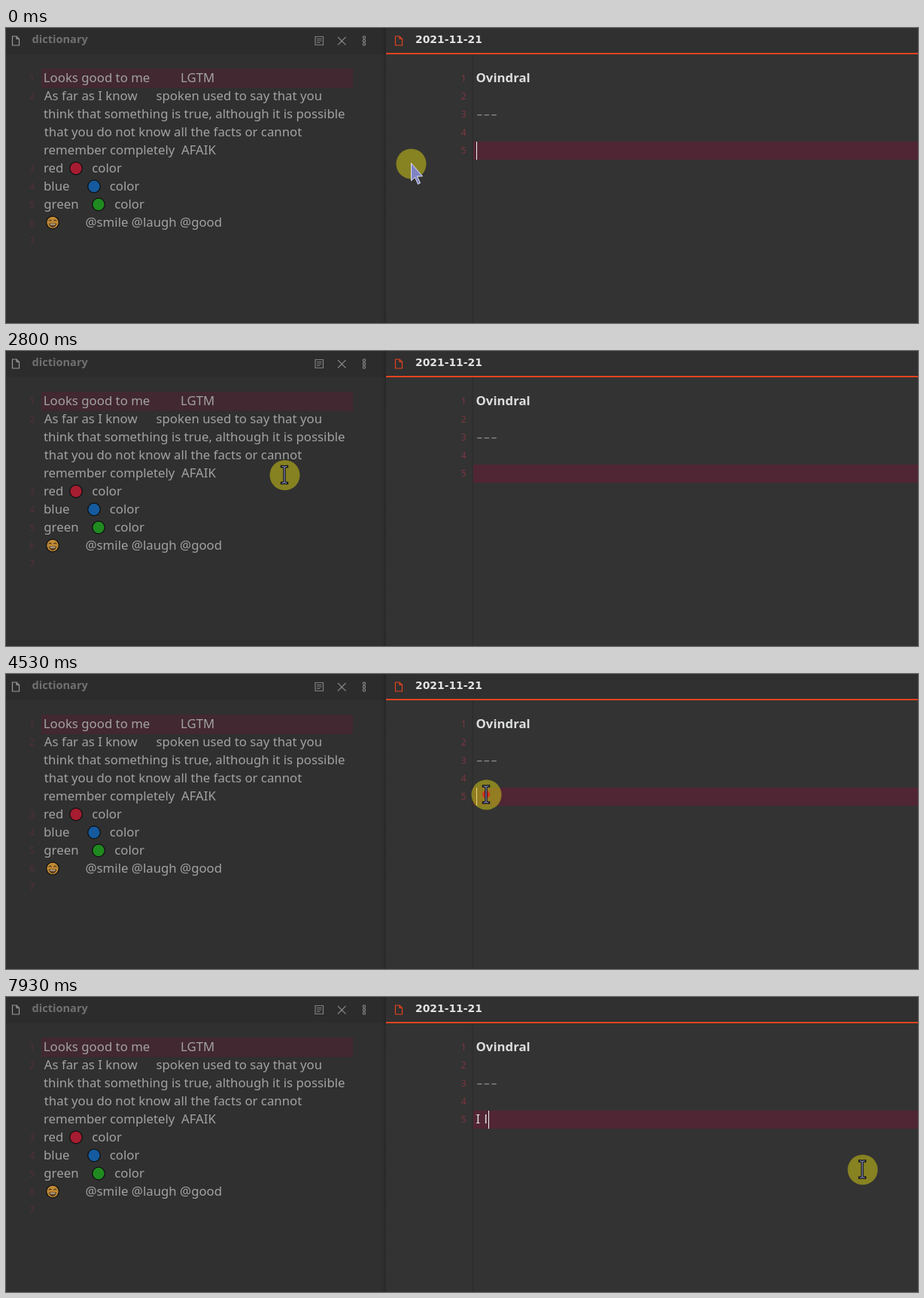
Recreate the animation shown at these times as an HTML page. Size 1212 by 392 pixels, loop 8 s.

```html
<!DOCTYPE html>
<html lang="en">
<head>
<meta charset="utf-8">
<title>Two-pane editor</title>
<style>
  html, body { margin: 0; width: 100%; height: 100%; overflow: hidden; background: #333; }
  svg { display: block; }
  text { font: 16.8px "Noto Sans", sans-serif; white-space: pre; }
  .left { fill: #a2a2a2; }
  .right { fill: #dcddde; }
  .title { font-size: 14.6px; font-weight: 700; }
  .date { font: 700 13.9px "DejaVu Sans", sans-serif; }
  .bold { font-weight: 700; }
  .rule { font: 16px "Noto Sans Mono", monospace; fill: #8c8c8c; }
  .num { font-size: 12px; text-anchor: end; }
  .icon { fill: none; stroke: #808080; stroke-width: 1.2; }
</style>
</head>
<body>
<svg width="1212" height="392" viewBox="0 0 1212 392">
  <defs>
    <linearGradient id="edge"><stop stop-color="#000" stop-opacity="0"/><stop offset="1" stop-color="#000" stop-opacity=".16"/></linearGradient>
    <path id="file" d="M.5 .5H6L9.5 4V12.5H.5ZM6 .5V4H9.5"/>
    <path id="beam" d="M-3.5 -11H-1.5L0 -10L1.5 -11H3.5M0 -10V10M-3.5 11H-1.5L0 10L1.5 11H3.5"/>
  </defs>

  <rect width="505" height="392" fill="#303030"/>
  <rect width="505" height="35" fill="#2c2c2c"/>
  <rect x="499" width="6" height="392" fill="url(#edge)"/>
  <rect x="505" width="707" height="33" fill="#303030"/>
  <rect x="505" width="707" y="33" height="2" fill="#e3441f"/>
  <rect x="619.5" y="35" width="1" height="357" fill="#2b2b2b"/>
  <rect x="47" y="54" width="414" height="26" fill="#422830"/>
  <rect x="621" y="151" width="591" height="24" fill="#512634"/>

  <g class="icon">
    <use href="#file" x="8" y="10.5" stroke="#9a9a9a"/>
    <use href="#file" x="517" y="10.5" stroke="#e3441f"/>
    <path d="M411 11.5H421.5V22.5H411ZM413 14.5H419.5M413 17H419.5M413 19.5H417.5M441 12L451.5 22.5M451.5 12L441 22.5"/>
    <circle cx="476" cy="12.5" r="1.7"/><circle cx="476" cy="17" r="1.7"/><circle cx="476" cy="21.5" r="1.7"/>
  </g>

  <g id="page"></g>

  <g stroke="#111" stroke-width="1.3">
    <circle cx="93" cy="186.5" r="8.3" fill="#a61c30"/>
    <circle cx="117" cy="210.5" r="8.3" fill="#155a9f"/>
    <circle cx="123" cy="234.5" r="8.3" fill="#1f8a1f"/>
    <circle cx="62" cy="258.5" r="8.3" fill="#c08a35"/>
  </g>
  <g fill="none" stroke="#3a2814" stroke-width="1.2">
    <path d="M57 256.5Q58.5 254 60.5 256.5M63.5 256.5Q65.5 254 67 256.5"/>
    <path d="M57.5 260H66.5Q65.5 264.5 62 264.5Q58.5 264.5 57.5 260Z" fill="#6b4a28" stroke-width="1"/>
    <path d="M58.5 260.8H65.5" stroke="#cfc6b8"/>
  </g>

  <text id="typed" class="right" x="624.5" y="168" style="word-spacing:1px"></text>
  <rect id="caret" y="151" width="1" height="24" fill="#f2f2f2"/>

  <g id="pointer">
    <circle cx=".5" cy=".5" r="20" fill="rgba(204,196,20,.55)"/>
    <circle id="click" r="5" fill="#d2301f"/>
    <path id="arrow" d="M.5 -.5V23L5.5 18.5L9.5 27.5L12.5 26L8.5 17H15.5Z" fill="#8084c4" stroke="#dcdcec" stroke-width="1"/>
    <g id="ibeam" fill="none">
      <use href="#beam" stroke="#10101c" stroke-width="3.4" stroke-linecap="square"/>
      <use href="#beam" stroke="#8f97c4" stroke-width="1.1"/>
    </g>
  </g>
</svg>
<script>
const LOOP = 8000, FPS = 15, BLINK = 533;
const $ = id => document.getElementById(id);
const row = n => 72 + 24 * n;

function write(text, x, y, cls, fill) {
  const el = document.createElementNS("http://www.w3.org/2000/svg", "text");
  el.setAttribute("x", x);
  el.setAttribute("y", y);
  el.setAttribute("class", cls);
  if (fill) el.setAttribute("fill", fill);
  el.textContent = text;
  $("page").append(el);
}

write("dictionary", 34.5, 20, "title", "#707070");
write("2021-11-21", 544, 20, "date", "#e2e2e2");

// Each chunk: text, x, row
[
  ["Looks good to me", 49.8, 0], ["LGTM", 232, 0],
  ["As far as I know", 50.8, 1], ["spoken used to say that you", 199.5, 1],
  ["think that something is true, although it is possible", 50, 2],
  ["that you do not know all the facts or cannot", 50.8, 3],
  ["remember completely", 50, 4], ["AFAIK", 233, 4],
  ["red", 50, 5], ["color", 114.3, 5],
  ["blue", 50, 6], ["color", 137.8, 6],
  ["green", 50.3, 7], ["color", 144.3, 7],
  ["@smile @laugh @good", 105.5, 8]
].forEach(([text, x, n]) => write(text, x, row(n), "left"));

[0, 1, 5, 6, 7, 8, 9].forEach((n, i) => write(i + 1, 38, row(n) - 1.5, "num", "#54303a"));
[0, 1, 2, 3, 4].forEach(n => write(n + 1, 611.5, row(n) - 1.5, "num", "#7c3640"));
write("Ovindral", 624.5, row(0), "right bold");
write("–––", 624.5, row(2), "rule");

// Pointer path: time, x, y
const path = [
  [0, 538, 180], [550, 538, 180], [800, 470, 172], [1100, 270, 95],
  [1400, 100, 24], [1930, 90, 23], [2270, 96, 26], [2530, 210, 60],
  [2670, 290, 102], [2800, 370, 164], [3000, 362, 272], [3130, 365, 262],
  [3400, 412, 210], [3700, 560, 230], [3970, 690, 250], [4130, 666, 226],
  [4330, 645, 176], [4470, 638, 160], [4900, 638, 160], [5380, 1113, 220],
  [5670, 1057, 184], [5950, 1115, 216], [6130, 1138, 229], [LOOP, 1138, 229]
];

// Monotone tangents keep the pointer from overshooting its stops.
function slope(i, axis) {
  const a = path[i - 1], b = path[i], c = path[i + 1];
  if (!a || !c) return 0;
  const s = (b[axis] - a[axis]) / (b[0] - a[0]);
  const u = (c[axis] - b[axis]) / (c[0] - b[0]);
  return s * u > 0 ? 2 * s * u / (s + u) : 0;
}

function along(t, axis) {
  const i = Math.max(1, path.findIndex(p => p[0] >= t));
  const a = path[i - 1], b = path[i], d = b[0] - a[0], k = (t - a[0]) / d;
  const ease = k * k * (3 - 2 * k);
  return a[axis] + (b[axis] - a[axis]) * ease
    + d * k * (1 - k) * ((1 - k) * slope(i - 1, axis) - k * slope(i, axis));
}

// Typing: time, text, caret x
const typing = [[0, "", 625], [7130, "I", 632], [7330, "I ", 637], [7800, "I l", 641]];
// Blinking restarts at a click and at every key press.
const restarts = [-266, 4530, 7130, 7330, 7800];

const last = (list, test) => list.filter(test).pop();
const show = (id, on) => $(id).setAttribute("visibility", on ? "visible" : "hidden");

function draw(now) {
  const clock = now % LOOP;
  const t = Math.floor((clock + 5) * FPS / 1000) % (LOOP * FPS / 1000) * 1000 / FPS + 1;

  const x = along(t, 1), y = along(t, 2);
  const inGutter = x > 503 && x < 618;
  $("pointer").setAttribute("transform", `translate(${x.toFixed(1)} ${y.toFixed(1)})`);
  show("arrow", inGutter);
  show("ibeam", !inGutter);
  show("click", t >= 4530 && t < 4670);

  const [, text, caretX] = last(typing, k => k[0] <= t);
  $("typed").textContent = text;
  $("caret").setAttribute("x", caretX);
  const since = t - last(restarts, r => r <= t);
  show("caret", Math.floor(since / BLINK) % 2 === 0);
}

const start = performance.now();
function tick() {
  draw(performance.now() - start);
  requestAnimationFrame(tick);
}
tick();
</script>
</body>
</html>
```
